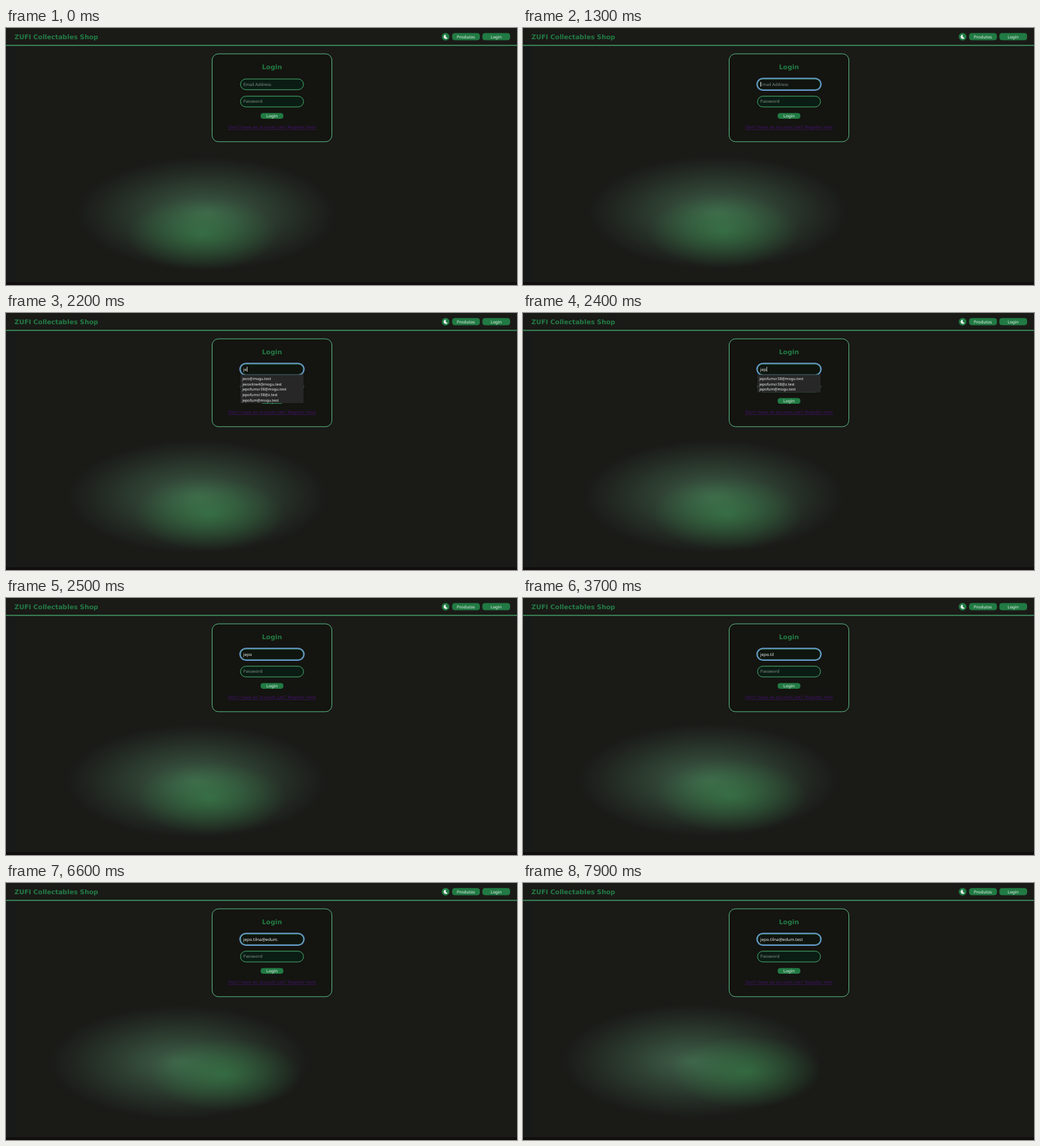
Animation, 730 px wide and 368 px high, one loop 8000 ms. Source, as an HTML page:

```html
<!DOCTYPE html>
<html lang="pt">
<head>
<meta charset="utf-8">
<title>Login</title>
<style>
  html, body { margin: 0; height: 100%; overflow: hidden; background: #1a1a17; }
  svg { display: block; width: 100%; height: 100%; }
  text { font: 6.05px "Noto Sans", sans-serif; fill: #eef3ef; text-rendering: geometricPrecision; white-space: pre; }
  .title { font: bold 9.22px "DejaVu Sans", sans-serif; fill: #237b45; }
  .mid { text-anchor: middle; }
  .hint { fill: #819087; }
  .link { font: 6.05px "DejaVu Sans", sans-serif; fill: #43136d; text-decoration: underline; }
  .btn { fill: #217a43; }
  .field { fill: #0a1c13; stroke: #45a56c; }
  #menu text { font-size: 5.4px; }
</style>
</head>
<body>
<svg viewBox="0 0 730 368">
  <defs>
    <radialGradient id="haze">
      <stop offset="0" stop-color="#62a078" stop-opacity=".53"/>
      <stop offset=".5" stop-color="#5c9670" stop-opacity=".27"/>
      <stop offset=".85" stop-color="#58886e" stop-opacity=".08"/>
      <stop offset="1" stop-color="#58886e" stop-opacity="0"/>
    </radialGradient>
    <radialGradient id="glow">
      <stop offset="0" stop-color="#3a9450" stop-opacity=".5"/>
      <stop offset=".5" stop-color="#38904c" stop-opacity=".26"/>
      <stop offset="1" stop-color="#348a48" stop-opacity="0"/>
    </radialGradient>
  </defs>

  <rect width="730" height="368" fill="#1a1a17"/>
  <rect y="26" width="14" height="338" fill="#181a19"/>
  <ellipse id="outer" rx="186" ry="82" fill="url(#haze)"/>
  <ellipse id="inner" rx="108" ry="52" fill="url(#glow)"/>
  <rect y="364" width="730" height="4" fill="#120e0e"/>

  <rect y="24.2" width="730" height="1.3" fill="#45a56c"/>
  <text class="title" x="12" y="15.8">ZUFI Collectables Shop</text>
  <circle class="btn" cx="628" cy="12.4" r="5.5"/>
  <path d="M628.6 9.4A3.1 3.1 0 1 0 631 14.1A3 3 0 0 1 628.6 9.4Z" fill="#eef3ef"/>
  <rect class="btn" x="637.3" y="7.3" width="39.7" height="10.2" rx="4"/>
  <text class="mid" x="657" y="14.6">Produtos</text>
  <rect class="btn" x="680.5" y="7.3" width="39.7" height="10.2" rx="4"/>
  <text class="mid" x="700.2" y="14.6">Login</text>

  <rect x="294.5" y="37" width="171" height="125.8" rx="9" fill="#141410" stroke="#55b07b"/>
  <text class="title mid" x="380" y="59.2">Login</text>
  <rect id="email" class="field" x="335" y="73" width="90" height="15.3" rx="7.6"/>
  <rect id="ring" x="334.2" y="72.2" width="91.6" height="16.8" rx="8.4" fill="none" stroke="#6396c8" stroke-width="1.8"/>
  <text id="emailHint" class="hint" x="339" y="82.7">Email Address</text>
  <text id="typed" x="339" y="82.7"></text>
  <rect id="caret" y="77" width=".7" height="7" fill="#eef3ef"/>
  <rect class="field" x="335" y="97.7" width="90" height="15.3" rx="7.6"/>
  <text class="hint" x="339" y="107.4">Password</text>
  <rect class="btn" x="363.7" y="121.8" width="32.6" height="8.2" rx="4"/>
  <text class="mid" x="380" y="128.1">Login</text>
  <text class="link mid" x="380" y="144.2">Don't have an account yet? Register here</text>

  <g id="menu">
    <rect x="335" y="88.3" width="90" fill="#272727"/>
  </g>
</svg>
<script>
const LOOP = 8000;
const ADDRESS = 'jepo.tilna@edum.test';
const SAVED = ['jevo@mogu.test', 'jevostine4@mogu.test', 'jepofumcr38@mogu.test',
  'jepofumcr38@z.test', 'jepofum@mogu.test'];
const ROW = 7.65;

// [start in ms, typed characters, caret visible]
const KEYS = [
  [1300, 0, 1], [1900, 1, 1], [2200, 2, 1], [2400, 3, 1], [2500, 4, 0],
  [2900, 5, 1], [3300, 6, 1], [3500, 7, 1], [3700, 8, 0], [3900, 9, 0],
  [4000, 10, 0], [4800, 11, 0], [5400, 12, 1], [5600, 12, 0], [5700, 13, 0],
  [6000, 14, 0], [6300, 15, 1], [6600, 16, 0], [6700, 18, 0], [6800, 19, 0],
  [7000, 20, 1], [7300, 20, 0]
];

const el = id => document.getElementById(id);
const show = (node, on) => node.style.display = on ? '' : 'none';
const menuBox = el('menu').firstElementChild;

const items = SAVED.map(address => {
  const item = document.createElementNS('http://www.w3.org/2000/svg', 'text');
  item.textContent = address;
  item.setAttribute('x', 337.5);
  return el('menu').appendChild(item);
});

function drift(id, t, from, to) {
  const k = t / LOOP;
  el(id).setAttribute('cx', from[0] + (to[0] - from[0]) * k);
  el(id).setAttribute('cy', from[1] + (to[1] - from[1]) * k);
}

function drawMenu(t) {
  show(el('menu'), t >= 1900 && t < 2500);
  const first = t < 2300 ? 0 : 2; // the list narrows to matching entries
  menuBox.setAttribute('height', (SAVED.length - first) * ROW + 2.4);
  items.forEach((item, i) => {
    show(item, i >= first);
    item.setAttribute('y', 96.1 + (i - first) * ROW);
  });
}

function drawField(t) {
  const [start, count, caretOn] = KEYS.findLast(key => key[0] <= t) || [0, 0, 0];
  const focused = start > 0;
  el('email').style.fill = focused ? '#10140f' : '';
  show(el('ring'), focused);
  show(el('emailHint'), !count);
  el('typed').textContent = ADDRESS.slice(0, count);
  show(el('caret'), caretOn);
  const width = count ? el('typed').getComputedTextLength() : 0;
  el('caret').setAttribute('x', 339.1 + width);
}

function frame(now) {
  const t = now % LOOP;
  drift('outer', t, [286, 266], [240, 255]);
  drift('inner', t, [280, 295], [320, 270]);
  drawField(t);
  drawMenu(t);
  requestAnimationFrame(frame);
}
frame(0);
</script>
</body>
</html>
```
